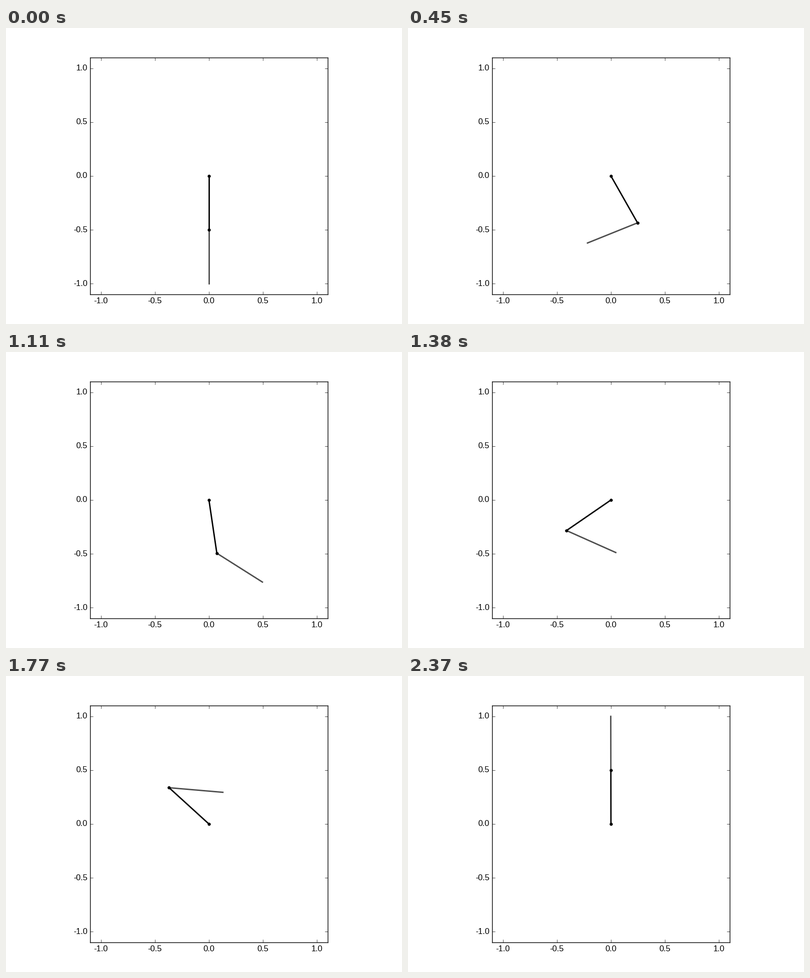
A matplotlib script for the animation above (2400 ms loop, 800 by 600 pixels).

```python
import numpy as np
import matplotlib.pyplot as plt
from matplotlib.animation import FuncAnimation

FRAMES = 80
INTERVAL = 30
LINK = 0.5

plt.rcParams.update({
    "font.family": "Liberation Sans",
    "font.size": 12,
    "text.kerning_factor": 6,
    "axes.unicode_minus": False,
    "axes.linewidth": 1.0,
    "lines.solid_capstyle": "projecting",
})

# Swing-up poses: step and link angles in degrees from straight down
STEP = [0, 8, 15, 18, 24, 33, 37, 41, 46, 54, 59, 72, 79]
UPPER = [0, 8.3, 29.5, 35.4, 28.6, 14.2, 8.4, -9.5, -55.4, -114, -132.4, -174, -179.9]
LOWER = [0, -17.5, -68, -100, -170.2, -275, -302.4, -314.5, -294.1, -284, -274.9,
         -191.4, -179.9]


def clamped_spline(t, y, x):
    """Cubic spline through (t, y) that starts and ends at rest."""
    t, y = np.array(t, float), np.array(y, float)
    n = len(t)
    h = np.diff(t)
    d = np.diff(y) / h
    a = np.eye(n)
    b = np.zeros(n)
    for i in range(1, n - 1):
        a[i, i - 1:i + 2] = h[i], 2 * (h[i - 1] + h[i]), h[i - 1]
        b[i] = 3 * (h[i] * d[i - 1] + h[i - 1] * d[i])
    m = np.linalg.solve(a, b)
    i = np.clip(np.searchsorted(t, x, side="right") - 1, 0, n - 2)
    u = (x - t[i]) / h[i]
    return (y[i] + (y[i + 1] - y[i]) * u * u * (3 - 2 * u)
            + h[i] * u * (1 - u) * (m[i] * (1 - u) - m[i + 1] * u))


def link_path(angles):
    """Vector along a link for every frame."""
    a = np.radians(clamped_spline(STEP, angles, np.arange(FRAMES)))
    return LINK * np.column_stack([np.sin(a), -np.cos(a)])


joints = link_path(UPPER)
tips = joints + link_path(LOWER)

fig = plt.figure(figsize=(8, 6), dpi=100, facecolor="white")
ax = fig.add_axes([170 / 800, 60 / 600, 480 / 800, 480 / 600])
ax.set(xlim=(-1.1, 1.1), ylim=(-1.1, 1.1))

ticks = np.arange(-1, 1.1, 0.5)
labels = [f"{v:.1f}" for v in ticks]
ax.set_xticks(ticks, labels)
ax.set_yticks(ticks, labels, va="center")
ax.tick_params(direction="in", top=True, right=True, length=4, width=0.5, pad=4)

lower_line, = ax.plot([], [], color="black", alpha=0.7, lw=2)
upper_line, = ax.plot([], [], color="black", lw=2, marker="o",
                      markersize=4, markeredgewidth=0.5)


def draw(i):
    upper_line.set_data(*zip((0, 0), joints[i]))
    lower_line.set_data(*zip(joints[i], tips[i]))
    return lower_line, upper_line


anim = FuncAnimation(fig, draw, frames=FRAMES, interval=INTERVAL,
                     repeat=True, repeat_delay=0)
plt.show()
```
